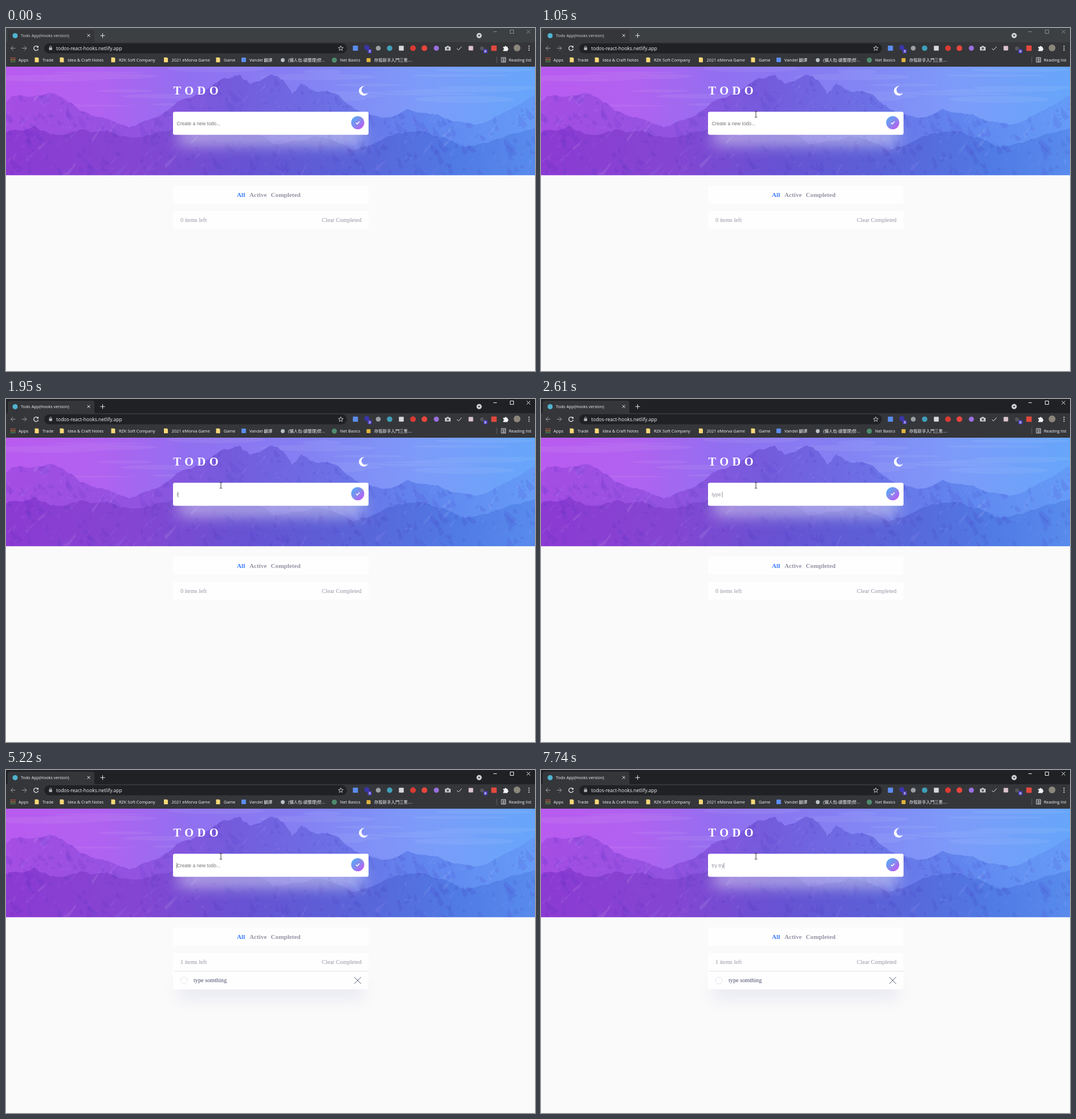
These frames come from a looping animation (928 px wide and 603 px high, 8 s). An HTML page:

```html
<!DOCTYPE html>
<html lang="en">
<head>
<meta charset="utf-8">
<title>Todo App</title>
<style>
html, body { margin: 0; width: 100%; height: 100%; overflow: hidden; background: #fafafa; }
svg { display: block; width: 928px; height: 603px; }
text { white-space: pre; }
.ui { font-family: "Open Sans", "Noto Sans CJK TC", "Noto Sans CJK", sans-serif; font-size: 7.4px; fill: #f1f3f4; }
.page { font-family: "Liberation Serif", serif; font-size: 10.24px; fill: #9495a5; }
.bold { font-weight: 700; font-size: 11.2px; }
.field { font-family: "Liberation Sans", sans-serif; font-size: 8.53px; }
.line { fill: none; stroke: #e8eaed; stroke-width: 1; }
</style>
</head>
<body>
<svg viewBox="0 0 928 603">
  <defs>
    <linearGradient id="sky">
      <stop offset="0" stop-color="#b95bf0"/><stop offset=".18" stop-color="#b062f0"/>
      <stop offset=".35" stop-color="#9070f0"/><stop offset=".55" stop-color="#857ff3"/>
      <stop offset=".78" stop-color="#7d9bf9"/><stop offset="1" stop-color="#66a6fa"/>
    </linearGradient>
    <linearGradient id="far">
      <stop offset="0" stop-color="#a54de4"/><stop offset=".25" stop-color="#9253e0"/>
      <stop offset=".42" stop-color="#745bdc"/><stop offset=".6" stop-color="#6d6ee4"/>
      <stop offset=".8" stop-color="#6086ee"/><stop offset="1" stop-color="#659bf7"/>
    </linearGradient>
    <linearGradient id="near">
      <stop offset="0" stop-color="#8c3ad2"/><stop offset=".25" stop-color="#8446d2"/>
      <stop offset=".45" stop-color="#6752d3"/><stop offset=".65" stop-color="#5a62d8"/>
      <stop offset=".85" stop-color="#507ae4"/><stop offset="1" stop-color="#588bec"/>
    </linearGradient>
    <linearGradient id="button" x1=".1" y1=".1" x2=".9" y2=".9">
      <stop offset="0" stop-color="#57a9f7"/><stop offset=".5" stop-color="#8689ee"/>
      <stop offset="1" stop-color="#c058f3"/>
    </linearGradient>
    <filter id="blur" x="-30%" y="-300%" width="160%" height="700%"><feGaussianBlur stdDeviation="14"/></filter>
    <clipPath id="hero"><rect y="68" width="928" height="190.5"/></clipPath>
    <clipPath id="rock"><path id="rockShape"/></clipPath>
  </defs>

  <rect width="928" height="603" fill="#fafafa"/>
  <g clip-path="url(#hero)">
    <rect y="68" width="928" height="191" fill="url(#sky)"/>
    <g id="clouds" fill="#fff" opacity=".06"></g>
    <path id="farRidge" fill="url(#far)"/>
    <path id="nearRidge" fill="url(#near)"/>
    <g id="facets" clip-path="url(#rock)"></g>
    <rect x="303" y="181" width="323" height="21" fill="#e4e5f1" opacity=".8" filter="url(#blur)"/>
  </g>

  <g id="chrome">
    <rect id="tabBar" width="928" height="25"/>
    <path d="M0 25q3 0 3-3V7q0-4 4-4H151q4 0 4 4V22q0 3 3 3H928V68H0z" fill="#35363a"/>
    <circle cx="16" cy="13.5" r="4.5" fill="#4fb3cf"/>
    <path class="line" d="M142.6 10.7l5 5m0-5l-5 5M165.5 13.3h8m-4-4v8"/>
    <circle cx="830" cy="13.3" r="4.6" fill="#d0d2d5"/><path d="M827.7 12.2h4.6l-2.3 2.8z" fill="#35363a"/>
    <path id="controls" fill="none" d="M855 6.5h6M884.5 3.5h6v6h-6zM913.5 3.5l6 6m0-6l-6 6"/>
    <path class="line" d="M16.5 35.5H8.5m4-4l-4 4 4 4" stroke="#a5a7aa" style="stroke:#9a9da1"/>
    <path class="line" d="M28 35.5h8m-4-4l4 4-4 4" style="stroke:#9a9da1"/>
    <path class="line" d="M56 33.2a4 4 0 1 0 .6 3.5" style="stroke-width:1.3"/><path d="M57 31v3.5h-3.5z" fill="#e8eaed"/>
    <rect x="67" y="27" width="531" height="17.5" rx="8.7" fill="#202124"/>
    <rect x="75.5" y="34.3" width="5.4" height="4.5" rx=".5" fill="#b4b7ba"/>
    <path class="line" d="M76.6 35v-1.7a1.6 1.6 0 0 1 3.2 0V35" style="stroke:#b4b7ba;stroke-width:.9"/>
    <path class="line" d="M587.3 31.3l1.2 2.9 3 .2-2.3 2 .7 3-2.6-1.6-2.6 1.6.7-3-2.3-2 3-.2z" style="stroke-width:.8"/>
    <text class="ui" x="26" y="16" style="font-size:7.28px" id="tabTitle">Todo App(Hooks version)</text>
    <text class="ui" x="88" y="38.6" style="font-size:8.5px">todos-react-hooks.netlify.app</text>
    <path d="M861 50.5v11" stroke="#5f6368"/>
    <path class="line" d="M869 52h7.5v8H869zM871 54.2h4m-4 2h4m-4 2h4" style="stroke-width:.9"/>
  </g>

  <text class="page" x="293.5" y="117" style="font-weight:700;font-size:20.48px;letter-spacing:6.4px;fill:#fff">TODO</text>
  <path d="M629 102.3A8.3 8.3 0 1 0 635.2 113.4 6.7 6.7 0 1 1 629 102.3z" fill="#fff"/>
  <rect x="293" y="147.3" width="343" height="40.5" rx="3.2" fill="#fff"/>
  <circle cx="617" cy="166.5" r="11.5" fill="url(#button)"/>
  <path d="M614 166.7l2.1 2 4.1-4.2" fill="none" stroke="#fff" stroke-width="1.5"/>
  <text id="input" class="field" x="299.5" y="170.8"></text>
  <rect id="caret" y="163" width=".8" height="10" fill="#74757f"/>

  <rect id="listShadow" x="303" y="376" width="323" height="24" fill="#e4e5f1" filter="url(#blur)"/>
  <rect x="293" y="277" width="343" height="32" rx="3" fill="#fefefe"/>
  <rect x="293" y="321.5" width="343" height="32" rx="3" fill="#fefefe"/>
  <g class="page">
    <text class="bold" x="405" y="297" fill="#3a7bfd">All</text>
    <text class="bold" x="427" y="297">Active</text>
    <text class="bold" x="464.5" y="297">Completed</text>
    <text id="count" x="306" y="341"></text>
    <text x="554" y="341">Clear Completed</text>
  </g>
  <g id="item">
    <rect x="293" y="353" width="343" height="32.5" rx="3" fill="#fefefe"/>
    <path d="M295 353.6H636" stroke="#e1e2ea"/>
    <circle cx="312.2" cy="370" r="6" fill="none" stroke="#e4e5f1"/>
    <text class="page" x="329" y="373" style="fill:#494c6b">type somthing</text>
    <path d="M611 364l11.8 11.8m0-11.8L611 375.8" stroke="#494c6b" stroke-width=".9"/>
  </g>

  <circle id="click" cx="376" cy="150.5" r="7.2" fill="#f5e62a" opacity=".88"/>
  <g id="pointer">
    <path id="arrow" d="M0 0V11L2.6 8.6 4.3 12.4 6 11.6 4.4 8H7.8z" fill="#fff" stroke="#000" stroke-width=".6"/>
    <path id="beam" d="M-2.2-5q1.7 0 2.2.7.5-.7 2.2-.7M0-4.3V4.8M-2.2 5.5q1.7 0 2.2-.7.5.7 2.2.7" fill="none" stroke="#24242c" stroke-width=".9"/>
  </g>
</svg>
<script>
const $ = id => document.getElementById(id);
const LOOP = 8000;

function add(parent, tag, attrs, content) {
  const node = document.createElementNS("http://www.w3.org/2000/svg", tag);
  for (const key in attrs) node.setAttribute(key, attrs[key]);
  if (content) node.textContent = content;
  return parent.appendChild(node);
}

// Browser bookmarks and extension icons
const chrome = $("chrome");
const label = (x, text) => add(chrome, "text", { class: "ui", x, y: 58.6 }, text);
const square = (x, y, size, fill) =>
  add(chrome, "rect", { x: x - size / 2, y: y - size / 2, width: size, height: size, rx: 1, fill });
const disc = (cx, cy, r, fill) => add(chrome, "circle", { cx, cy, r, fill });

["#e8604c", "#e8a33d", "#58b368"].forEach((color, row) => {
  for (let col = 0; col < 3; col++) square(9 + col * 3.2, 52.8 + row * 3.2, 2, color);
});
label(22, "Apps");
[[64, "Trade"], [108, "Idea & Craft Notes"], [198, "RZK Soft Company"],
 [290.5, "2021 eMorva Game"], [382, "Game"]].forEach(([x, text]) => {
  add(chrome, "path", { d: `M${x - 13.5} 51.8h5.2l1.8 1.2v7.2h-7z`, fill: "#f6d878" });
  label(x, text);
});
square(417, 56, 8, "#5b8def");
label(427, "Vandel 翻譯");
disc(485.5, 56.5, 3.4, "#b9c0c6");
label(495, "(懶人包-總整理)勞...");
disc(576, 56.5, 4.5, "#4f8a6c");
label(586, "Net Basics");
square(636, 56.5, 7, "#e0b43c");
label(646, "存股新手入門三隻....");
label(882, "Reading list");

square(613, 35.5, 9, "#5b8def");
disc(633, 34.5, 4.5, "#3a35a8");
disc(653, 35.5, 4.3, "#9aa0a3");
disc(673, 35.5, 4.8, "#3f9fb8");
square(693.5, 35.5, 8.5, "#d6d8da");
disc(714, 35.5, 5, "#d93a32");
disc(734, 35.5, 5, "#e8463c");
disc(755, 35.5, 4.5, "#9a6fe0");
add(chrome, "path", { d: "M770 33h2.5l1-1.5h3l1 1.5h2.5v6.5h-10z", fill: "#c8cacc" });
disc(775, 36, 2, "#55585c");
add(chrome, "path", { d: "M791 36l2.7 2.7 5.6-6", class: "line" });
square(815.5, 35.5, 8, "#dcc4cc");
disc(835, 36, 3.4, "#55565c");
square(856, 35.5, 9.5, "#e2483d");
add(chrome, "path", { d: "M872.3 33h2.5a1.5 1.5 0 1 1 3 0h2.2v2.4a1.5 1.5 0 1 1 0 3v2.1h-7.7v-2.2a1.4 1.4 0 0 0 0-2.9z", fill: "#f1f3f4" });
disc(896.5, 35, 6, "#8b867c");
[32, 35.5, 39].forEach(y => disc(917.5, y, 1, "#f1f3f4"));
[[638, "3"], [841, "0"]].forEach(([x, text]) => {
  square(x, 40.7, 7, "#4c3fc0");
  add(chrome, "text", { class: "ui", x, y: 43, "text-anchor": "middle", style: "font-size:6px;font-weight:700" }, text);
});

// Mountain landscape
let seed = 7;
const random = () => (seed = (seed * 16807) % 2147483647) / 2147483647;

function ridge(points, rough) {
  let line = points;
  for (let pass = 0; pass < 3; pass++, rough /= 2) {
    line = line.flatMap(([x, y], i) => {
      if (!i) return [[x, y]];
      const [px, py] = line[i - 1];
      return [[(px + x) / 2, (py + y) / 2 + (random() - .5) * rough], [x, y]];
    });
  }
  return "M" + line.map(([x, y]) => `${x.toFixed(1)} ${y.toFixed(1)}`).join("L") + "L928 260 0 260z";
}

const farRidge = ridge([
  [0, 130], [22, 118], [76, 114], [104, 126], [130, 146], [180, 160], [215, 175], [262, 158],
  [300, 130], [345, 112], [378, 90], [410, 82], [428, 98], [465, 82], [486, 91], [502, 116],
  [518, 97], [545, 112], [582, 117], [612, 143], [660, 158], [705, 142], [740, 150], [775, 160],
  [822, 170], [870, 150], [928, 118]], 9);
const nearRidge = ridge([
  [0, 184], [48, 172], [88, 188], [135, 178], [190, 185], [240, 192], [300, 176], [352, 190],
  [408, 172], [470, 205], [540, 190], [610, 215], [670, 190], [735, 182], [800, 208], [860, 196], [928, 176]], 14);
$("farRidge").setAttribute("d", farRidge);
$("nearRidge").setAttribute("d", nearRidge);
$("rockShape").setAttribute("d", farRidge);

for (let i = 0; i < 22; i++) {
  add($("clouds"), "ellipse", { cx: random() * 928, cy: 70 + random() * 70, rx: 30 + random() * 80, ry: 1.5 + random() * 5 });
}

const tones = ["#3c22b0", "#ffffff", "#4a2cc0", "#e2b4ff", "#3a38b8", "#a8b4ff"];
tones.forEach((fill, layer) => {
  let d = "";
  for (let i = 0; i < 170; i++) {
    const x = random() * 940 - 6, y = 85 + random() * 175;
    const size = 3 + random() * random() * 22, lean = (layer % 2 ? -1 : 1) * size * (.3 + random());
    d += `M${x.toFixed(1)} ${y.toFixed(1)}l${lean.toFixed(1)} ${size.toFixed(1)}`
       + `l${(-lean * .3 - 4).toFixed(1)} ${(size * .3).toFixed(1)}l${(-lean * .4).toFixed(1)} ${(-size * .5).toFixed(1)}z`;
  }
  add($("facets"), "path", { d, fill, opacity: layer % 2 ? .09 : .11 });
});

// Timeline
const typing = [
  [0, ""], [1950, "t"], [2150, "ty"], [2280, "typ"], [2480, "type"], [2610, "type "],
  [2870, "type s"], [3000, "type so"], [3130, "type som"], [3530, "type somt"], [3730, "type somth"],
  [3860, "type somthi"], [4000, "type somthin"], [4200, "type somthing"], [4680, ""],
  [5880, "t"], [6480, "tr"], [6680, "try"], [6810, "try "], [7080, "try t"], [7480, "try tr"], [7740, "try try"]];
const caretOff = [[0, 1160], [1690, 1950], [4750, 5220], [5750, 5880], [6410, 6480]];
const route = [[854, 544], [735, 420], [590, 265], [455, 135], [372, 93], [330, 110], [350, 138], [377, 151.5]];

const show = (id, visible) => $(id).setAttribute("visibility", visible ? "visible" : "hidden");

function pointerAt(t) {
  const step = Math.floor((t - 140) / 68.1);
  const s = Math.min(1, Math.max(0, step / 11));
  const u = (1 - (1 - s) ** 1.6) * (route.length - 1);
  const i = Math.min(route.length - 2, Math.floor(u));
  return route[i].map((v, k) => v + (route[i + 1][k] - v) * (u - i));
}

function render(t) {
  const active = t >= 1160;
  $("tabBar").setAttribute("fill", active ? "#202124" : "#3c4043");
  $("controls").setAttribute("stroke", active ? "#f4f4f4" : "#8d9093");
  $("tabTitle").style.fill = active ? "#f1f3f4" : "#d5d7da";

  const typed = typing.filter(([start]) => t >= start).pop()[1];
  const input = $("input");
  input.textContent = typed || "Create a new todo...";
  input.setAttribute("fill", typed ? "#9293a0" : "#757575");
  // Trailing spaces count towards the caret position.
  $("caret").setAttribute("x", 299.2 + (typed ? input.getComputedTextLength() : 0));
  show("caret", !caretOff.some(([from, to]) => t >= from && t < to));

  const added = t >= 4680;
  $("count").textContent = `${added ? 1 : 0} items left`;
  show("item", added);
  show("listShadow", added);

  const [x, y] = pointerAt(t);
  const overField = x > 293 && x < 604 && y > 147 && y < 188;
  $("pointer").setAttribute("transform", `translate(${x} ${y})`);
  const present = t >= 140;
  show("arrow", present && !overField);
  show("beam", present && overField);
  show("click", t >= 1160 && t < 1290);
}

function tick() {
  render(performance.now() % LOOP);
  requestAnimationFrame(tick);
}
tick();
</script>
</body>
</html>
```
